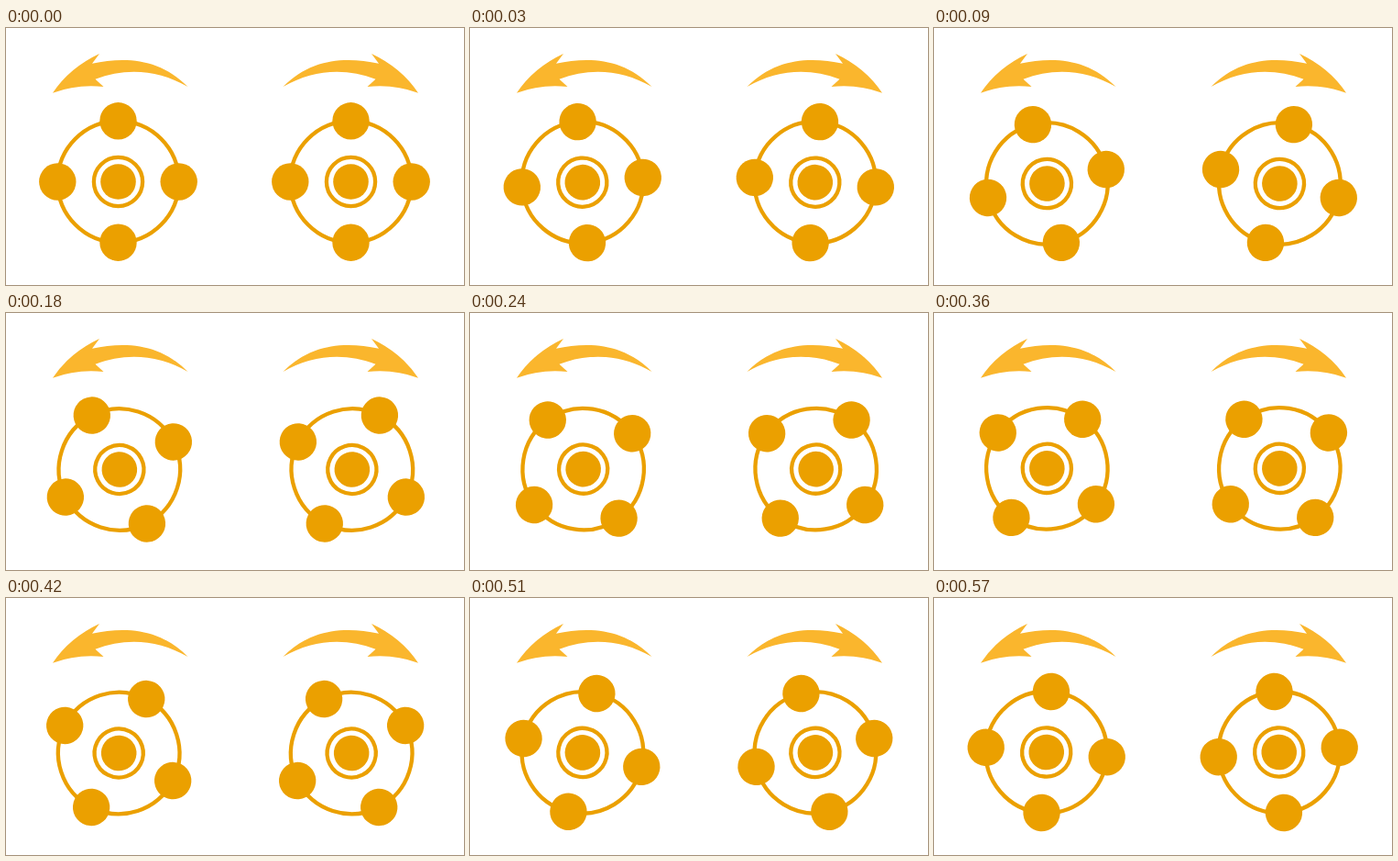
An HTML page that plays this animation: 500x280 px, repeating every 600 ms.

```html
<!DOCTYPE html>
<html lang="en">
<head>
<meta charset="utf-8">
<title>Turning wheels</title>
<style>
  html, body { margin: 0; width: 100%; height: 100%; overflow: hidden; background: #fff; }
  svg { display: block; width: 500px; height: 280px; }
  .solid { fill: #eba000; }
  .ring { fill: none; stroke: #eba000; stroke-width: 4.3; }
  .arrow { fill: #fab62d; }
</style>
</head>
<body>
<svg viewBox="0 0 500 280">
  <defs>
    <path id="arrow" class="arrow" d="M51 70.8 Q69 43.5 102 28 L94 38.8 C130 31 168 33 198.5 64 C166 45 130 43 97.5 55.8 L106.5 64 Q77 61 51 70.8Z"/>
    <g id="wheel">
      <circle class="ring" r="66.2"/>
      <circle class="ring" r="26.6"/>
      <circle class="solid" r="19.3"/>
      <circle class="solid" cy="-66.2" r="20.2"/>
      <circle class="solid" cx="66.2" r="20.2"/>
      <circle class="solid" cy="66.2" r="20.2"/>
      <circle class="solid" cx="-66.2" r="20.2"/>
    </g>
  </defs>
  <use href="#arrow"/>
  <use href="#arrow" transform="translate(501 0) scale(-1 1)"/>
  <use id="left" href="#wheel"/>
  <use id="right" href="#wheel"/>
</svg>
<script>
  const STEP = 30, STEPS = 20;
  // Vertical drift of the hubs: [step, pixels]
  const DRIFT = [[0, 0], [3, 2], [6, 3], [10, 2.2], [14, 1.5], [17, 0.9], [20, 0.3]];
  const left = document.getElementById('left');
  const right = document.getElementById('right');

  function driftAt(step) {
    const i = DRIFT.findIndex(([s]) => s > step);
    const [s0, d0] = DRIFT[i - 1], [s1, d1] = DRIFT[i];
    return d0 + (d1 - d0) * (step - s0) / (s1 - s0);
  }

  function place(wheel, x, y, angle) {
    wheel.setAttribute('transform', `translate(${x} ${y}) rotate(${angle})`);
  }

  function draw(now) {
    const step = Math.floor(now / STEP) % STEPS;
    const angle = step * 90 / STEPS;
    const dy = driftAt(step), dx = dy * 0.45;
    place(left, 122.5 + dx, 167.5 + dy, -angle);
    place(right, 376.5 + dx, 167.5 + dy, angle);
  }

  let start;
  function tick(now) {
    start ??= now;
    draw(now - start);
    requestAnimationFrame(tick);
  }
  draw(0);
  requestAnimationFrame(tick);
</script>
</body>
</html>
```
